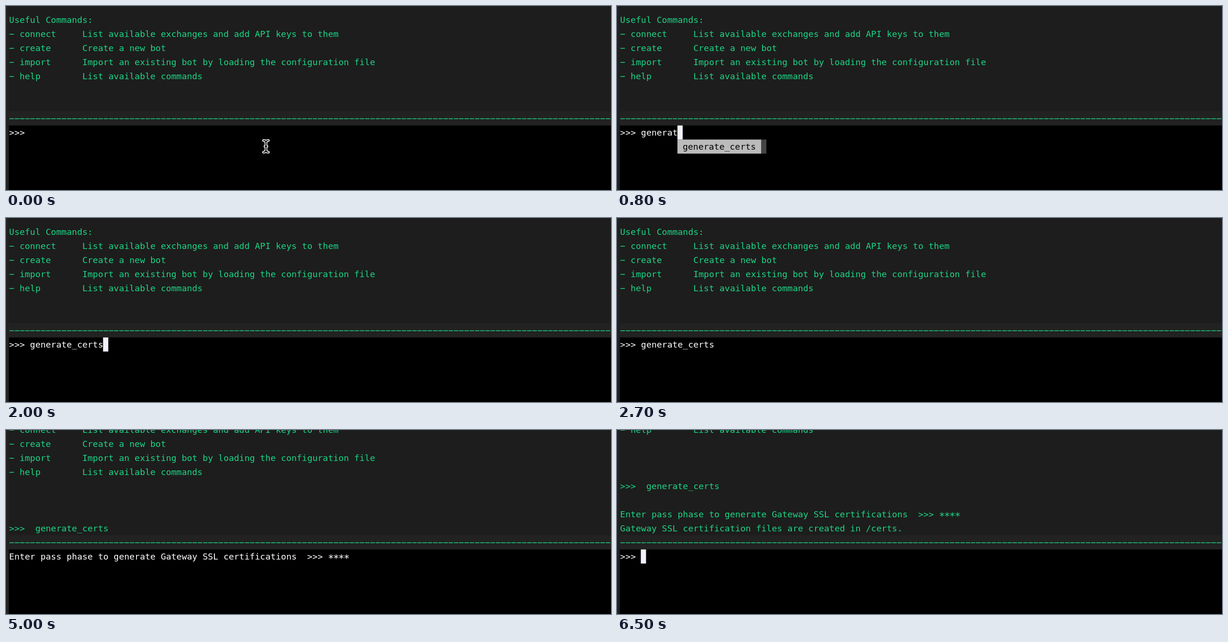
An HTML page with a canvas that plays this animation: 1280 px wide and 392 px high, repeating every 6.6 s.

```html
<!DOCTYPE html>
<html lang="en">
<head>
<meta charset="utf-8">
<title>Terminal session</title>
<style>
  html, body { margin: 0; width: 100%; height: 100%; overflow: hidden; background: #222; }
  canvas { display: block; }
</style>
</head>
<body>
<canvas id="stage" width="1280" height="392"></canvas>
<script>
const ctx = document.getElementById('stage').getContext('2d');

const LOOP = 6600;
const LEFT = 6.6, CELL = 11.07, ROW = 30;
const LOG_BOTTOM = 224.5, INPUT_TOP = 254.5;
const GREEN = '#1cd485', WHITE = '#fff';
const FONT = '18.39px "DejaVu Sans Mono", Menlo, monospace';

const COMMAND = 'generate_certs';
const PASS_PROMPT = 'Enter pass phase to generate Gateway SSL certifications  >>> ';

const LOG = [
  'Useful Commands:',
  '− connect     List available exchanges and add API keys to them',
  '− create      Create a new bot',
  '− import      Import an existing bot by loading the configuration file',
  '− help        List available commands',
  '', '', '',
  '>>>  ' + COMMAND,
  '',
  PASS_PROMPT + '****',
  'Gateway SSL certification files are created in /certs.'
];

// Each entry is [start time, value]; the value holds until the next entry.
const TYPED = [[0, 0], [200, 1], [300, 3], [500, 4], [600, 5], [700, 6], [800, 7],
  [900, 8], [1100, 9], [1200, 10], [1300, 11], [1400, 12], [1600, 13], [1900, 14]];
const STARS = [[0, 0], [3900, 1], [4000, 2], [4100, 3], [4300, 4]];
const CURSOR = [[0, false], [200, true], [2700, false], [2900, true], [4900, false],
  [5200, true], [5900, false], [6500, true]];
const SCROLL = [[0, 0], [2900, 2], [5100, 5]];

const valueAt = (track, t) => track.filter(([start]) => start <= t).pop()[1];
const column = n => LEFT + n * CELL;

function box(x, y, w, h, color) {
  ctx.fillStyle = color;
  ctx.fillRect(x, y, w, h);
}

function write(text, x, baseline, color) {
  ctx.fillStyle = color;
  ctx.font = FONT;
  const plain = text.replace(/\*/g, ' ');
  ctx.fillText(plain, x, baseline);
  // Asterisks sit at mid height, slightly larger than the default glyph.
  ctx.font = FONT.replace('18.39', '21.5');
  [...text].forEach((char, i) => {
    if (char === '*') ctx.fillText('*', x + i * CELL - 0.9, baseline + 4.6);
  });
}

function drawLog(scroll) {
  ctx.save();
  ctx.beginPath();
  ctx.rect(6, 0, 1274, LOG_BOTTOM);
  ctx.clip();
  box(6, 0, 1274, LOG_BOTTOM, '#1d1d1d');
  LOG.forEach((line, i) => write(line, LEFT, 36.3 + (i - scroll) * ROW, GREEN));
  ctx.restore();
}

function drawMenu(x) {
  box(x, INPUT_TOP + ROW, CELL * 16, ROW, '#bbb');
  box(x + CELL * 16, INPUT_TOP + ROW, CELL, ROW, '#444');
  write(COMMAND, x + CELL, 306.3, '#000');
}

function drawPointer(x, y) {
  const beam = new Path2D();
  for (const s of [-1, 1]) {
    beam.moveTo(x - 5, y + 12.5 * s);
    beam.quadraticCurveTo(x, y + 12.5 * s, x, y + 8 * s);
    beam.quadraticCurveTo(x, y + 12.5 * s, x + 5, y + 12.5 * s);
  }
  beam.moveTo(x, y - 9);
  beam.lineTo(x, y + 9);
  beam.moveTo(x - 2, y);
  beam.lineTo(x + 2, y);
  ctx.lineCap = 'round';
  for (const [width, color] of [[5.6, WHITE], [2.2, '#000']]) {
    ctx.lineWidth = width;
    ctx.strokeStyle = color;
    ctx.stroke(beam);
  }
}

function inputAt(t) {
  if (t >= 5100) return '>>> ';
  if (t >= 2900) return PASS_PROMPT + '*'.repeat(valueAt(STARS, t));
  return '>>> ' + COMMAND.slice(0, valueAt(TYPED, t));
}

function draw(t) {
  box(0, 0, 1280, 392, '#222');
  drawLog(valueAt(SCROLL, t));
  write('−'.repeat(116), LEFT, 246.3, GREEN);
  box(6, INPUT_TOP, 1274, 392 - INPUT_TOP, '#000');

  const input = inputAt(t);
  const cursorX = column(input.length) - 0.5;
  write(input, LEFT, 276.3, WHITE);
  if (valueAt(CURSOR, t)) box(cursorX, INPUT_TOP, CELL, ROW, '#f0f1fc');
  if (t >= 200 && t < 2000) drawMenu(cursorX);
  if (t < 200) drawPointer(550, 299);
}

const begin = performance.now();
function tick() {
  draw((performance.now() - begin) % LOOP);
  requestAnimationFrame(tick);
}
tick();
</script>
</body>
</html>
```
